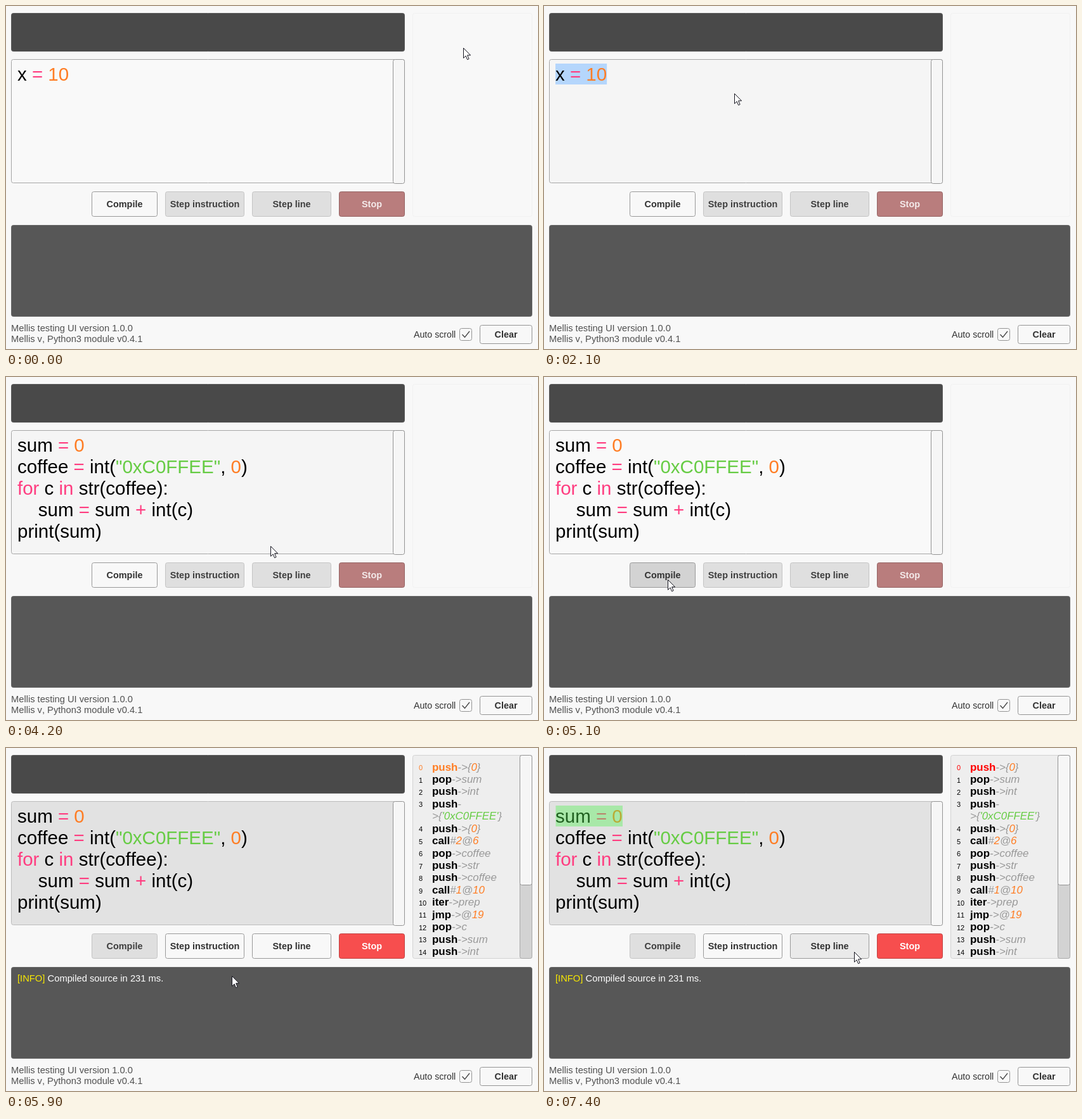
An HTML page with a canvas that plays this animation: 839 px wide and 542 px high, repeating every 8000 ms.

```html
<!DOCTYPE html>
<html>
<head>
<meta charset="utf-8">
<style>
  html, body { margin: 0; width: 100%; height: 100%; overflow: hidden; background: #f8f8f8; }
  canvas { display: block; }
</style>
</head>
<body>
<canvas id="stage" width="839" height="542"></canvas>
<script>
const ctx = document.getElementById('stage').getContext('2d');
const LOOP = 8000, TICK = 100;
const PINK = '#ff3d80', ORANGE = '#ff7d24', GREEN = '#66cc44', GREY = '#999';

const CODE = ['sum = 0', 'coffee = int("0xC0FFEE", 0)', 'for c in str(coffee):', '    sum = sum + int(c)', 'print(sum)'];

// number, operation, argument; a row without a number continues the one above
const OPS = [
  [0, 'push', '->{0}'], [1, 'pop', '->sum'], [2, 'push', '->int'], [3, 'push', '-'],
  ['', '', ">{'0xC0FFEE'}"], [4, 'push', '->{0}'], [5, 'call', '#2@6'], [6, 'pop', '->coffee'],
  [7, 'push', '->str'], [8, 'push', '->coffee'], [9, 'call', '#1@10'], [10, 'iter', '->prep'],
  [11, 'jmp', '->@19'], [12, 'pop', '->c'], [13, 'push', '->sum'], [14, 'push', '->int']
];

// pointer path: time, x, y
const PATH = [
  [0, 721, 66], [300, 467, 158], [400, 467, 158], [800, 106, 104], [1200, 106, 104],
  [1600, 0, 80], [1700, 0, 80], [2100, 300, 138], [2600, 300, 138], [3000, 325, 470],
  [3500, 364, 188], [3700, 433, 263], [4100, 433, 263], [4200, 417, 267], [5000, 195, 320],
  [5300, 195, 320], [5400, 200, 321], [5700, 285, 386], [6000, 391, 347], [6100, 391, 347],
  [6500, 489, 322], [8000, 489, 322]
];

const font = (size, style = '') => `${style} ${size}px "Liberation Sans", Arial, sans-serif`;

function pointerAt(t) {
  const i = Math.max(1, PATH.findIndex(p => p[0] >= t));
  const [t0, x0, y0] = PATH[i - 1], [t1, x1, y1] = PATH[i];
  const k = (t - t0) / (t1 - t0);
  return [Math.round(x0 + (x1 - x0) * k), Math.round(y0 + (y1 - y0) * k)];
}

function box(x, y, w, h, fill, stroke, radius = 3) {
  ctx.beginPath();
  ctx.roundRect(x + .5, y + .5, w - 1, h - 1, radius);
  ctx.fillStyle = fill;
  ctx.fill();
  ctx.strokeStyle = stroke;
  ctx.lineWidth = 1;
  ctx.stroke();
}

// draws text and returns the x where it ends
function text(str, x, y, color, face) {
  ctx.font = face;
  ctx.fillStyle = color;
  ctx.fillText(str, x, y);
  return x + ctx.measureText(str).width;
}

function highlighted(str, x, y, base, face) {
  for (const part of str.split(/("[^"]*"|'[^']*'|\bfor\b|\bin\b|[=+]|\b\d+\b)/)) {
    const color = /^["']/.test(part) ? GREEN
      : /^(for|in|[=+])$/.test(part) ? PINK
      : /^\d+$/.test(part) ? ORANGE : base;
    x = text(part, x, y, color, face);
  }
}

function button(label, x, y, w, h, fill, stroke, color) {
  box(x, y, w, h, fill, stroke);
  ctx.textAlign = 'center';
  text(label, x + w / 2, y + h / 2 + 5, color, font(14.4, 'bold'));
  ctx.textAlign = 'left';
}

function plainButton(label, x, w, enabled, pressed, [px, py]) {
  const over = px >= x && px < x + w && py >= 293 && py < 333;
  const fill = !enabled ? '#dfdfdf' : pressed ? '#d3d3d3' : over ? '#eaeaea' : '#f8f8f8';
  button(label, x, 293, w, 40, fill, enabled ? '#999' : '#c4c4c4', enabled ? '#323232' : '#3e3e3e');
}

function editor(t, running, pointer) {
  const hover = t >= 500 && t < 5000;
  box(8, 84, 621, 196, running ? '#e2e2e2' : hover ? '#f5f5f5' : '#f9f9f9', running ? '#bcbcbc' : '#a6a6a6');
  box(610, 84, 19, 197, '#f6f6f6', '#949494');

  const face = font(29.5);
  if (t < 2200) {
    const line = 'x = 10';
    ctx.font = face;
    const edge = n => 18 + ctx.measureText(line.slice(0, n)).width;
    if (t >= 1300) {
      let n = 0;
      while (t < 1600 && n < line.length && edge(n) < pointer[0]) n++;
      ctx.fillStyle = '#b5d6fc';
      ctx.fillRect(edge(n), 91, edge(line.length) - edge(n), 33);
    }
    highlighted(line, 18, 118, '#000', face);
  } else {
    CODE.forEach((line, i) => highlighted(line, 18, 118 + 34 * i, '#000', face));
    if (t >= 3400 && t < 4000 || t >= 4600 && t < 5100) {
      ctx.fillStyle = '#323232';
      ctx.fillRect(18, 159, 2, 33);
    }
  }
  if (t >= 7400) {
    ctx.fillStyle = 'rgba(80,240,80,.4)';
    ctx.fillRect(18.5, 91, 105.5, 33);
  }
}

function opList(t, running) {
  if (!running) return box(641, 11, 189, 322, '#f8f8f8', '#f1f1f1');
  box(641, 11, 189, 322, '#eeeeee', '#d2d2d2');
  OPS.forEach(([number, op, arg], i) => {
    const y = 35.6 + 19.43 * i;
    const color = i ? '#000' : t >= 7400 ? '#f00' : ORANGE;
    text(number, 651, y - .4, color, font(11));
    const x = text(op, 672, y, color, font(16.9, 'bold'));
    highlighted(arg, x, y, GREY, font(16.9, 'italic'));
  });
  box(810, 11, 20, 322, '#d3d3d3', '#a8a8a8');
  box(810, 11, 20, 206, '#f6f6f6', '#949494');
}

function footer() {
  text('Mellis testing UI version 1.0.0', 8, 514, '#505050', font(14.7));
  text('Mellis v, Python3 module v0.4.1', 8, 531, '#505050', font(14.7));
  text('Auto scroll', 643, 524, '#323232', font(14.2));
  box(715, 509, 20, 20, '#f8f8f8', '#949494');
  ctx.strokeStyle = '#444';
  ctx.lineWidth = 1.3;
  ctx.stroke(new Path2D('M719.5 519 L723.5 523.5 L731 514'));
  button('Clear', 747, 504, 83, 30, '#f8f8f8', '#949494', '#323232');
}

const ARROW = new Path2D('M.5 .5V16.3L4.1 12.8L6.6 18.7L9.1 17.6L6.6 11.8H11.6Z');

function drawPointer([x, y]) {
  ctx.save();
  ctx.translate(x, y);
  ctx.fillStyle = '#fff';
  ctx.fill(ARROW);
  ctx.strokeStyle = '#15151f';
  ctx.lineWidth = 1;
  ctx.stroke(ARROW);
  ctx.restore();
}

function draw(t) {
  const running = t >= 5400;
  const pointer = pointerAt(t);
  ctx.fontKerning = 'none';
  ctx.fillStyle = '#f8f8f8';
  ctx.fillRect(0, 0, 839, 542);

  box(8, 11, 621, 61, '#494949', '#5c5c5c');
  editor(t, running, pointer);
  plainButton('Compile', 135, 104, !running, t >= 5100, pointer);
  plainButton('Step instruction', 251, 125, running, false, pointer);
  plainButton('Step line', 388, 125, running, t === 7300, pointer);
  if (running) button('Stop', 525, 293, 104, 40, '#f74e4e', '#c04444', '#fff');
  else button('Stop', 525, 293, 104, 40, '#b97d7d', '#956464', '#f4eaea');
  opList(t, running);

  box(8, 346, 822, 145, '#575757', '#686868');
  if (running) {
    const x = text('[INFO]', 18, 369, '#f8e800', font(14.75));
    text(' Compiled source in 231 ms.', x, 369, '#fff', font(14.75));
  }
  footer();
  drawPointer(pointer);
}

const start = performance.now();
function frame() {
  const t = (performance.now() - start) % LOOP;
  draw(Math.floor(t / TICK) * TICK);
  requestAnimationFrame(frame);
}
frame();
</script>
</body>
</html>
```
